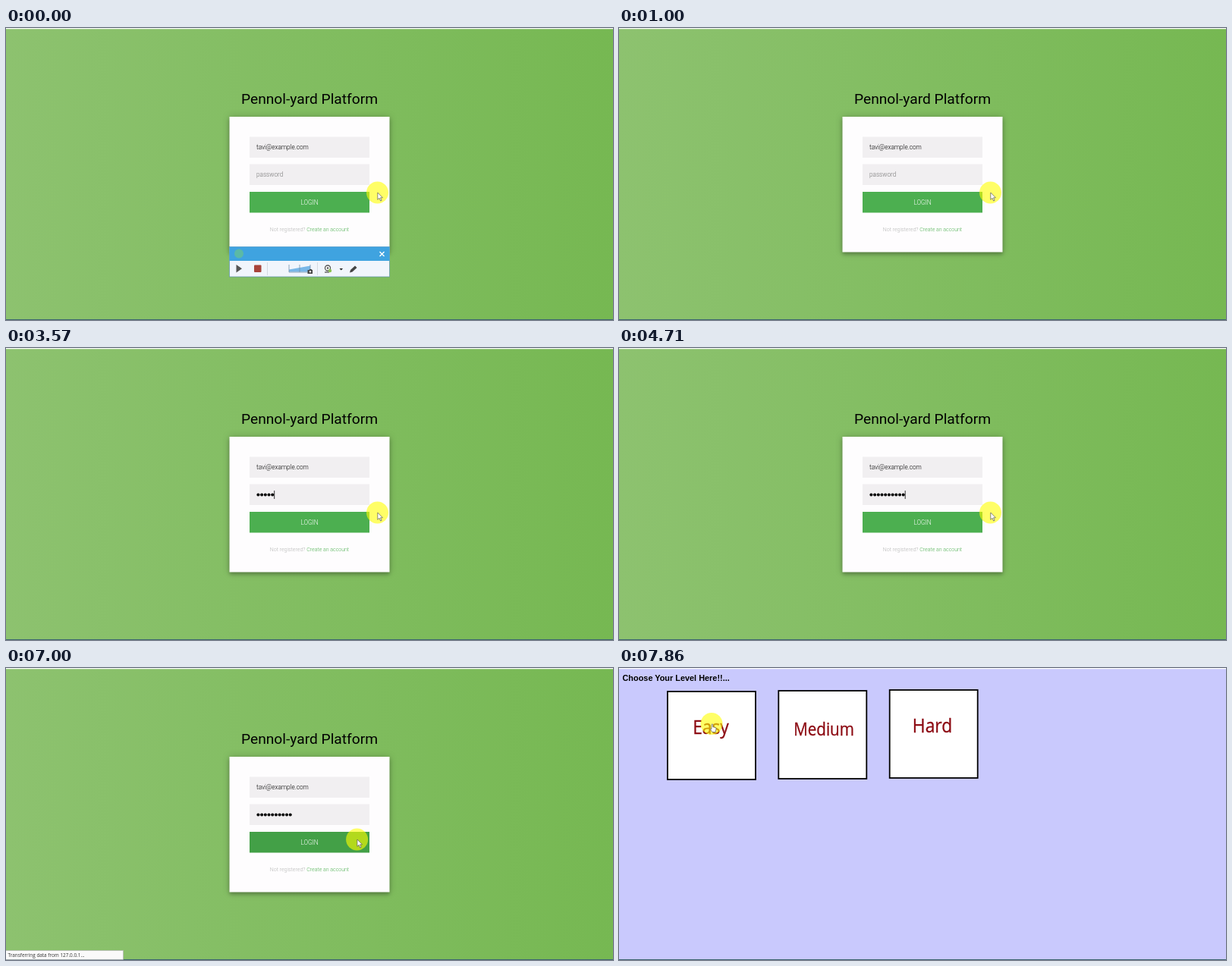
An HTML page for the animation above (8000 ms loop, 800 px wide and 385 px high).

```html
<!DOCTYPE html>
<html lang="en">
<head>
<meta charset="utf-8">
<title>Login and level choice</title>
<style>
  html, body { margin: 0; width: 100%; height: 100%; overflow: hidden; }
  svg { display: block; width: 800px; height: 385px; }
  text { font: 300 8.2px Roboto, sans-serif; }
  .title { font-size: 19.2px; font-weight: 400; }
  .small { font-size: 7px; }
  .heading { font: bold 10.9px "Liberation Sans", Arial, sans-serif; }
  .status { font: 6.4px "Open Sans", sans-serif; }
  .mid { text-anchor: middle; }
  .card { filter: drop-shadow(0 0 5px rgba(0,0,0,.2)) drop-shadow(0 3px 2px rgba(0,0,0,.24)); }
  #pictures text { font: 400 22.8px "Open Sans", sans-serif; fill: #8c0a12; stroke: #8c0a12; stroke-width: .3; }
  #pictures .medium { font-size: 20.6px; }
</style>
</head>
<body>
<svg viewBox="0 0 800 385">
  <defs>
    <linearGradient id="green">
      <stop stop-color="#8dc26f"/><stop offset="1" stop-color="#76b852"/>
    </linearGradient>
  </defs>

  <g id="login">
    <rect width="800" height="385" fill="url(#green)"/>
    <text class="title mid" x="400" y="99.5">Pennol-yard Platform</text>
    <rect class="card" x="294.5" y="117" width="211" height="178.5" fill="#fefdfe"/>
    <g fill="#f1eff1">
      <rect x="321" y="143.5" width="158" height="27.5"/>
      <rect x="321" y="179.5" width="158" height="27.5"/>
    </g>
    <text x="330" y="160">tavi@example.com</text>
    <text id="placeholder" x="330" y="196" fill="#757575">password</text>
    <g id="dots"></g>
    <path id="caret" d="M0 188v11" stroke="#000" stroke-width=".8"/>
    <rect id="button" x="321" y="216" width="158" height="27.5"/>
    <text class="mid" x="400" y="232.5" fill="#fff">LOGIN</text>
    <text class="small mid" x="400" y="267.5" fill="#b3b3b3">Not registered? <tspan fill="#4caf50">Create an account</tspan></text>
  </g>

  <g id="recorder">
    <rect x="294.5" y="288.5" width="211" height="39.5" fill="#f1f5fc" stroke="#5d8fae" stroke-width=".7"/>
    <rect x="294.5" y="288.5" width="211" height="18.5" fill="#3fa3e0"/>
    <circle cx="307" cy="297.5" r="6" fill="#5bb9a6"/>
    <path d="M492.5 295l6 6m0-6l-6 6" stroke="#fff" stroke-width="1.4"/>
    <path d="M303.5 312l7.5 5.3-7.5 5.3z" fill="#555"/>
    <rect x="327" y="312.5" width="9.5" height="9.5" rx="1" fill="#a8433a"/>
    <path d="M344.5 309v17M410.5 309v17" stroke="#d5dae2"/>
    <path d="M373 321.5v-3l28-5v8z" fill="#79b7e8"/>
    <path d="M373 312v10h28v-10M387 312v10" fill="none" stroke="#7794ad" stroke-width=".8"/>
    <path d="M397.5 319h2l1-1h2l1 1h.5v5h-6.500z" fill="#444"/>
    <circle cx="401" cy="321.3" r="1.2" fill="#fff"/>
    <circle cx="424" cy="316.500" r="3.5" fill="#fff" stroke="#555" stroke-width="1.3"/>
    <circle cx="424" cy="316.500" r="1.3" fill="#555"/>
    <path d="M420 322h6" stroke="#555" stroke-width="1.3"/>
    <circle cx="427" cy="320" r="2.2" fill="#8cc152"/>
    <path d="M439.500 317h4.500l-2.250 2.500z" fill="#222"/>
    <path d="M453 322.500l1-3.500 6-5.500 2.500 2.500-6 5.500z" fill="#444"/>
  </g>

  <g id="levels">
    <rect width="800" height="385" fill="#c9c9fd"/>
    <text class="heading" x="4.500" y="17">Choose Your Level Here!!...</text>
    <g fill="#fff" stroke="#000" stroke-width="1.8">
      <rect x="64" y="31" width="116" height="116"/>
      <rect x="210.300" y="30" width="116" height="116"/>
      <rect x="356.700" y="29" width="116" height="116"/>
    </g>
    <g id="pictures" class="mid">
      <text transform="translate(121 87) scale(1 1.150)">Easy</text>
      <text class="medium" transform="translate(270 88.500) scale(1 1.150)">Medium</text>
      <text transform="translate(413 85) scale(1 1.150)">Hard</text>
    </g>
  </g>

  <rect width="800" height="1.300" fill="#fbfbfb"/>
  <rect y="384" width="800" height="1" fill="#3d6670"/>
  <g id="status">
    <rect x="-1" y="372.500" width="155.500" height="11.800" fill="#fafafa" stroke="#b5b5b5" stroke-width=".7"/>
    <text class="status" x="2.500" y="381.300" fill="#333">Transferring data from 127.0.0.1...</text>
  </g>

  <g id="mouse">
    <circle r="14.500" fill="#ff0" fill-opacity=".6"/>
    <path id="arrow" d="M.3 0v9.300l2.200-2 1.600 3.700 1.500-.700-1.600-3.500h2.900z" fill="#fff" stroke="#555" stroke-width=".7"/>
    <path id="hand" d="M0 1q1-1.300 1.800 0v3.200l3.400.8q1 .4.8 1.800l-.8 4.200h-4.200l-2.800-3.800q0-1.400 1.800-.2z" fill="#fff" stroke="#555" stroke-width=".7"/>
  </g>
</svg>
<script>
const LOOP = 8000, STEPS_PER_SECOND = 7, DOT_PITCH = 4.7;
const keySteps = [14, 16, 19, 21, 23, 26, 27, 29, 31, 33];
// step, x, y
const mousePath = [[36, 489.5, 217], [37, 484, 219], [40, 463, 226], [51, 462.5, 226],
                   [52, 425, 209], [53, 290, 147], [54, 150, 86], [55, 122, 73.5]];
const el = id => document.getElementById(id);
const show = (id, on) => el(id).setAttribute("display", on ? "inline" : "none");

el("dots").innerHTML = keySteps.map((_, i) =>
  `<circle cx="${332.4 + i * DOT_PITCH}" cy="193.500" r="2"/>`).join("");

function mouseAt(step) {
  const next = mousePath.findIndex(p => p[0] >= step);
  if (next === 0) return mousePath[0].slice(1);
  const [s0, x0, y0] = mousePath[next - 1], [s1, x1, y1] = mousePath[next];
  const f = (step - s0) / (s1 - s0);
  return [x0 + (x1 - x0) * f, y0 + (y1 - y0) * f];
}

function draw(time) {
  const step = Math.min(55, Math.floor((time % LOOP + 5) * STEPS_PER_SECOND / 1000));
  const typed = keySteps.filter(s => s <= step).length;
  const hover = step >= 39;
  const hand = hover && step < 48 || step === 55;

  show("recorder", step < 1);
  show("login", step < 50);
  show("levels", step >= 50);
  show("pictures", step >= 52);
  show("status", step >= 48 && step < 52);

  show("placeholder", typed === 0);
  [...el("dots").children].forEach((dot, i) => dot.setAttribute("display", i < typed ? "inline" : "none"));
  show("caret", step >= 11 && step < 48);
  el("caret").setAttribute("transform", `translate(${330.2 + typed * DOT_PITCH})`);
  el("button").setAttribute("fill", hover ? "#43a047" : "#4caf50");

  show("hand", hand);
  show("arrow", !hand);
  el("mouse").setAttribute("transform", `translate(${mouseAt(step)})`);
  requestAnimationFrame(() => draw(performance.now() - start));
}
const start = performance.now();
draw(0);
</script>
</body>
</html>
```
